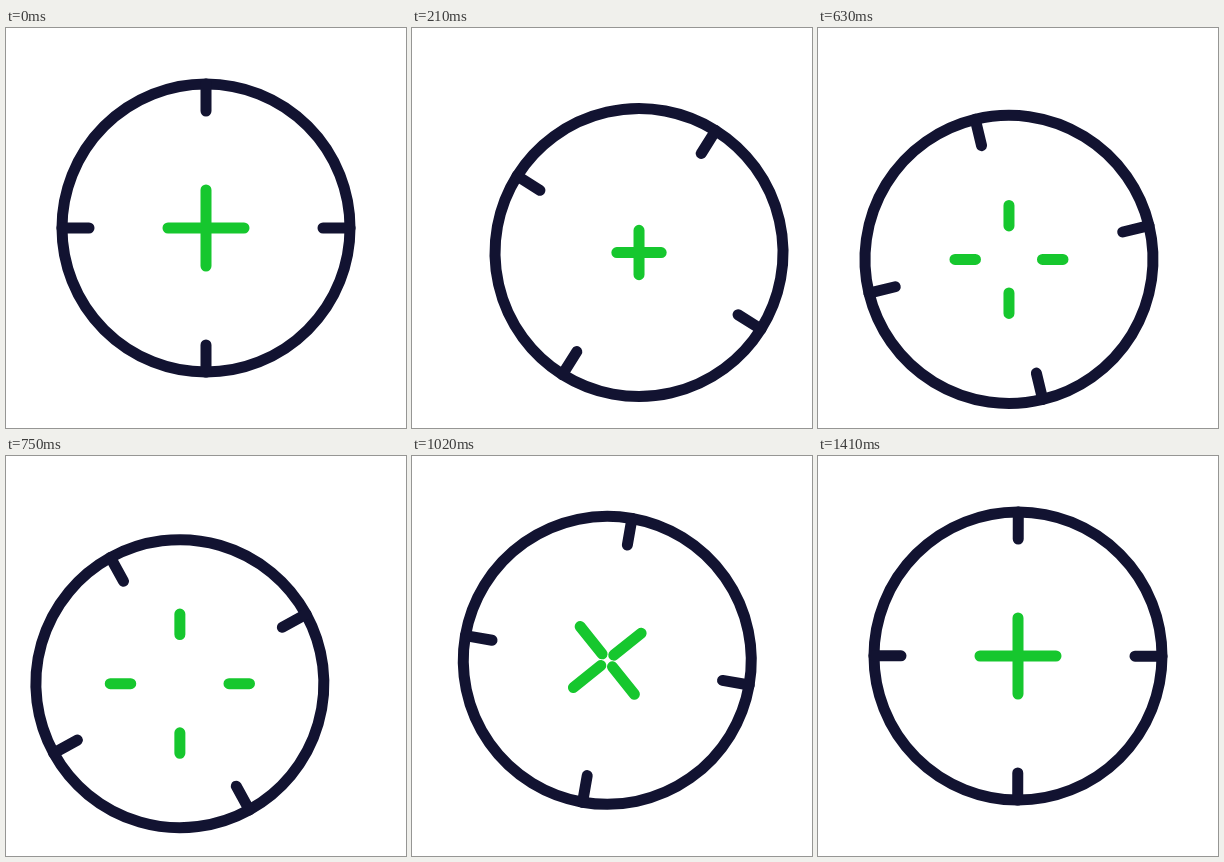
These frames come from a looping animation (400x400 px, 1440 ms). An HTML page:

```html
<!DOCTYPE html>
<html lang="en">
<head>
<meta charset="utf-8">
<title>Crosshair</title>
<style>
  html, body { margin: 0; width: 100%; height: 100%; overflow: hidden; background: #fff; }
  svg { display: block; width: 100vw; height: 100vh; }
  g { fill: none; stroke-width: 11; stroke-linecap: round; }
</style>
</head>
<body>
<svg viewBox="0 0 400 400">
  <g id="scope" stroke="#121331">
    <circle r="144"/>
    <path d="M0-144V-117M144 0H117M0 144V117M-144 0H-117"/>
  </g>
  <g id="cross" stroke="#16c72e"><path id="arms"/></g>
</svg>
<script>
const LOOP = 1440;

// Each track is a list of [ms, value] keys.
const tracks = {
  x: [[0, 200], [105, 210.5], [210, 227], [330, 228], [450, 227], [540, 222], [630, 191.2],
      [720, 176], [780, 173], [870, 174.8], [975, 190], [1080, 199.6], [1110, 200]],
  y: [[0, 200], [105, 209.5], [210, 224.5], [330, 227.5], [450, 229.4], [540, 231.2], [590, 232],
      [630, 231.4], [780, 226.5], [870, 221.5], [975, 209], [1080, 200.4], [1110, 200]],
  tilt: [[0, 0], [105, 13], [210, 32], [330, 44.5], [450, 42.6], [540, 33], [630, -13.3],
         [735, -30], [870, 3.7], [1000, 10], [1200, 4.5], [1440, 0]],
  length: [[0, 38], [105, 31], [210, 22.2], [330, 20.5], [780, 20.5], [870, 23.2], [975, 32], [1095, 38]],
  gap: [[450, 0], [540, 5.5], [630, 33.3], [720, 47], [780, 50], [870, 42], [975, 17], [1095, 0]],
  spin: [[805, 0], [1200, 90]]
};

const slope = (a, b) => (b[1] - a[1]) / (b[0] - a[0]);

// Tangent that never overshoots: flat at ends and turning points.
function tangent(keys, i) {
  if (!i || i === keys.length - 1) return 0;
  const a = slope(keys[i - 1], keys[i]), b = slope(keys[i], keys[i + 1]);
  return a * b > 0 ? 2 * a * b / (a + b) : 0;
}

function sample(keys, t) {
  const i = keys.findIndex(k => k[0] > t);
  if (i === 0) return keys[0][1];
  if (i < 0) return keys[keys.length - 1][1];
  const [t0, v0] = keys[i - 1], [t1, v1] = keys[i];
  const d = t1 - t0, u = (t - t0) / d, w = 1 - u;
  return v0 * w * w * (1 + 2 * u) + v1 * u * u * (1 + 2 * w)
    + d * u * w * (w * tangent(keys, i - 1) - u * tangent(keys, i));
}

const [scope, cross, arms] = ['scope', 'cross', 'arms'].map(id => document.getElementById(id));
const start = performance.now();

function draw(now) {
  const t = Math.max(0, now - start) % LOOP;
  const at = name => sample(tracks[name], t);
  const place = `translate(${at('x')} ${at('y')})`;
  const a = at('gap'), b = a + at('length');
  scope.setAttribute('transform', `${place} rotate(${at('tilt')})`);
  cross.setAttribute('transform', `${place} rotate(${at('spin')})`);
  arms.setAttribute('d', `M0 ${-a}V${-b}M${a} 0H${b}M0 ${a}V${b}M${-a} 0H${-b}`);
  requestAnimationFrame(draw);
}
draw(start);
</script>
</body>
</html>
```
